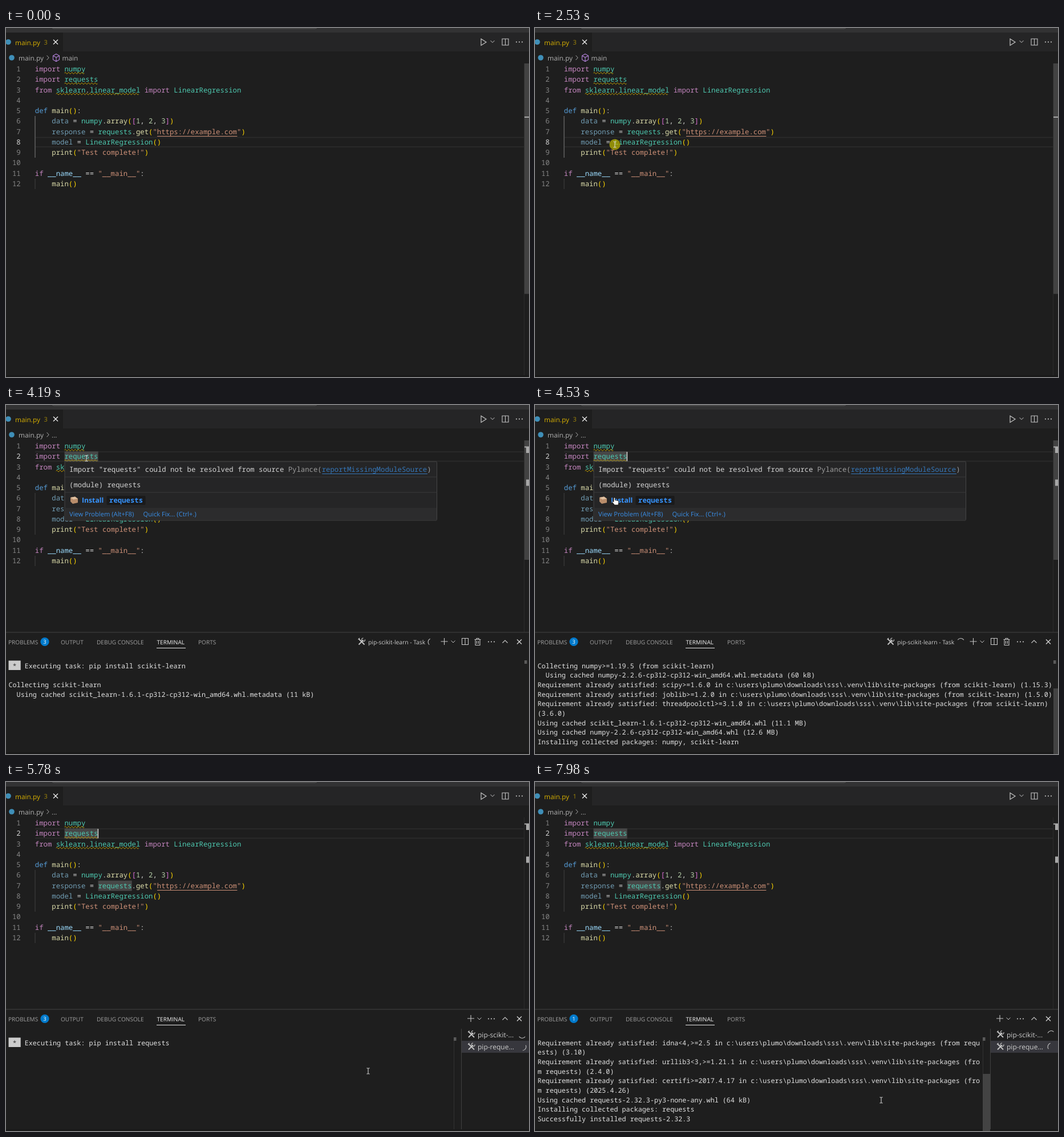
Write an HTML page that moves like this. It is 917x611 px and loops after 8000 ms.

```html
<!DOCTYPE html>
<html lang="en">
<head>
<meta charset="utf-8">
<title>Editor quick install</title>
<style>
  html, body { margin: 0; width: 100%; height: 100%; overflow: hidden; background: #1e1e1e; }
  svg { display: block; width: 100vw; height: 100vh; }
  text { white-space: pre; text-rendering: geometricPrecision; }
  .code { font: 500 12.31px "Noto Sans Mono", "DejaVu Sans Mono", monospace; }
  .term { font: 500 11.76px "Noto Sans Mono", "DejaVu Sans Mono", monospace; fill: #e2e2e2; }
  .ui { font-family: "Open Sans", "Noto Sans", sans-serif; }
</style>
</head>
<body>
<svg id="stage" viewBox="0 0 917 611"></svg>
<script>
const LOOP = 8000;
const PANEL = 2560, SECOND = 5100, CLICK = 3180, WORDS = 3450, LEAVE = 5400, SOLVED = 7500;
const CHAR = 7.388, LINE = 18.27;
const stage = document.getElementById("stage");
const timed = [];

const colX = c => 50.8 + c * CHAR;
const lineY = n => 72 + LINE * (n - 1);

function el(tag, attrs, parent = stage) {
  const node = document.createElementNS("http://www.w3.org/2000/svg", tag);
  for (const k in attrs) node.setAttribute(k, attrs[k]);
  parent.appendChild(node);
  return node;
}
const group = parent => el("g", {}, parent);
const rect = (x, y, width, height, fill, parent, more) =>
  el("rect", { x, y, width, height, fill, ...more }, parent);
const stroke = (d, color, parent, width = 1) =>
  el("path", { d, fill: "none", stroke: color, "stroke-width": width }, parent);
function label(x, y, str, size, fill, parent, more) {
  const node = el("text", { x, y, fill, "font-size": size, class: "ui", ...more }, parent);
  node.textContent = str;
  return node;
}
// Visible from one time up to another.
function during(node, from, to = LOOP) {
  timed.push({ node, from, to });
  return node;
}

const COLORS = {
  k: "#c586c0", t: "#4ec9b0", d: "#569cd6", f: "#dcdcaa", g: "#ffd700", o: "#da70d6",
  n: "#b5cea8", s: "#ce9178", v: "#9cdcfe", u: "#729eb5", w: "#d4d4d4", x: "#9d9d9d", l: "#3576b8"
};
// Rich text: {key} switches the colour.
function rich(x, y, str, parent) {
  const node = el("text", { x, y, class: "code" }, parent);
  const parts = ("{w}" + str).split(/\{(\w)\}/);
  for (let i = 1; i < parts.length; i += 2)
    if (parts[i + 1]) el("tspan", { fill: COLORS[parts[i]] }, node).textContent = parts[i + 1];
}

// Icons
const chevron = (x, y, p, c = "#c5c5c5") => stroke(`M${x - 3.5} ${y - 2}l3.5 3.5 3.5-3.5`, c, p);
const cross = (x, y, p, c = "#d4d4d4") => stroke(`M${x - 4} ${y - 4}l8 8m0-8l-8 8`, c, p, 1.3);
const split = (x, y, p) => stroke(`M${x - 5.5} ${y - 5.5}h11v11h-11zM${x} ${y - 5.5}v11`, "#c5c5c5", p, 1.1);
const plus = (x, y, p) => stroke(`M${x - 6} ${y}h12M${x} ${y - 6}v12`, "#c5c5c5", p, 1.1);
function dots(x, y, p) {
  for (const dx of [-5, 0, 5]) el("circle", { cx: x + dx, cy: y, r: 1.1, fill: "#c5c5c5" }, p);
}
function tools(x, y, p) {
  stroke(`M${x - 5} ${y - 5}l10 10M${x + 3} ${y - 3}l-8 8`, "#c5c5c5", p, 1.8);
  stroke(`M${x + 6} ${y - 4}a3 3 0 1 1-3-2.5M${x - 6} ${y - 4}l2.5-2.5`, "#c5c5c5", p, 1.2);
}
function trash(x, y, p) {
  stroke(`M${x - 5.5} ${y - 4}h11M${x - 2} ${y - 4}v-2h4v2M${x - 4} ${y - 4}v10h8v-10M${x - 1.5} ${y - 1.5}v5M${x + 1.5} ${y - 1.5}v5`, "#c5c5c5", p, 1.1);
}

// Window chrome
rect(0, 0, 917, 611, "#1e1e1e");
rect(0, 608, 917, 3, "#191919");
rect(0, 0, 917, 8, "#323233");
stroke("M80-3a4 4 0 0 0 4 4H542a4 4 0 0 0 4-4", "#5c5c5c");
rect(0, 8, 917, 33, "#252526");
rect(0, 8, 100, 33, "#1e1e1e");
el("circle", { cx: 4, cy: 24.5, r: 4.8, fill: "#3f8fb8" });
label(16, 29.5, "main.py", 11.8, "#d6af00");
const tabCount = label(66.5, 29, "3", 11, "#a38809");
cross(87, 24.5, stage, "#f0f0f0");
stroke("M833 19l9 5.7-9 5.7z", "#c5c5c5", stage, 1.2);
chevron(853, 24);
split(875.5, 24.5);
dots(900, 24.5);

el("circle", { cx: 10, cy: 52, r: 4.8, fill: "#3f8fb8" });
label(22, 56.5, "main.py", 11.8, "#b0b0b0");
stroke("M71.5 48l3.7 4-3.7 4", "#a9a9a9");
const crumb = during(group(), 0, 3600);
stroke("M88 45.5l5.5 3v7l-5.5 3-5.5-3v-7zM82.5 48.5l5.5 3 5.5-3M88 51.5v7", "#b180d7", crumb, 1.1);
label(98.5, 56.5, "main", 11.8, "#b0b0b0", crumb);
during(label(80, 56.5, "...", 11.8, "#b0b0b0"), 3600);

// Editor
function currentLine(n, from, to) {
  const g = during(group(), from, to), y = lineY(n);
  rect(51, y - 9.2, 858, 1.9, "#2a2a2a", g);
  rect(51, y + 7.2, 858, 1.9, "#2a2a2a", g);
}
currentLine(8, 0, CLICK);
currentLine(2, CLICK);

const wordBox = (line, col, len, fill, from, to) =>
  during(rect(colX(col), lineY(line) - 9, len * CHAR, 18, fill), from, to);
wordBox(3, 5, 20, "#20303a", 1530, 2440);
wordBox(2, 7, 8, "#474747", WORDS);
wordBox(7, 15, 8, "#474747", WORDS);

rect(50.5, 154, 1, 73, "#404040");
during(rect(50.5, 154, 1, 73, "#707070"), 0, CLICK);
rect(50.5, 264, 1, 18, "#404040");

const CODE = [
  "{k}import {t}numpy",
  "{k}import {t}requests",
  "{k}from {t}sklearn{w}.{t}linear_model {k}import {t}LinearRegression",
  "",
  "{d}def {f}main{g}(){w}:",
  "    {u}data{w} = {t}numpy{w}.{f}array{g}({o}[{n}1{w}, {n}2{w}, {n}3{o}]{g})",
  "    {u}response{w} = {t}requests{w}.{f}get{g}({s}\"https://example.com\"{g})",
  "    {u}model{w} = {t}LinearRegression{g}()",
  "    {f}print{g}({s}\"Test complete!\"{g})",
  "",
  "{k}if {v}__name__{w} == {s}\"__main__\"{w}:",
  "    {f}main{g}()"
];
const numbers = CODE.map((str, i) => {
  const y = lineY(i + 1) + 4;
  rich(colX(0), y, str);
  const num = el("text", { x: 25.7, y, class: "code", "text-anchor": "end" });
  num.textContent = i + 1;
  return num;
});
rect(colX(29), 189, 19 * CHAR, 1, COLORS.s);

function squiggle(line, col, len, to) {
  let d = `M${colX(col)} ${lineY(line) + 7}`;
  for (let i = 0; i < Math.round(len * CHAR / 5.8); i++) d += "q1.45-2.8 2.9 0q1.45 2.8 2.9 0";
  during(stroke(d, "#cca700"), 0, to);
}
squiggle(1, 7, 5, SOLVED);
squiggle(2, 7, 8, SOLVED);
squiggle(3, 5, 20, LOOP);

const brackets = during(group(), CLICK, WORDS);
for (const c of [28, 29])
  rect(colX(c), lineY(8) - 8.5, CHAR, 17, "none", brackets, { stroke: "#888888" });
const caret = rect(160.6, 82, 1.6, 16.5, "#d0d0cc");

// Editor scrollbar, shown while the pointer is over the editor, and its marks
rect(908, 62, 1, 546, "#2b2b2b");
during(rect(909, 62, 8, 403.5, "#424242"), 0, PANEL);
during(rect(909, 62, 8, 209, "#424242"), PANEL, LEAVE);
const mark = (x, y, h, from, to) => during(rect(x, y, 917 - x, h, "#a8a8a8"), from, to);
mark(909, 155, 2, 0, PANEL);
mark(909, 146, 2, PANEL, CLICK);
mark(909, 72.5, 2, CLICK);
mark(912, 142, 11, CLICK, WORDS);
mark(912, 73, 11, WORDS);
mark(912, 130.5, 11, WORDS);

// Panel
const panel = during(group(), PANEL);
rect(0, 397.5, 917, 210.5, "#1e1e1e", panel);
rect(0, 397.5, 917, 1, "#424242", panel);
[["PROBLEMS", 4], ["OUTPUT", 96], ["DEBUG CONSOLE", 159], ["TERMINAL", 264.5], ["PORTS", 337]]
  .forEach(([name, x]) => label(x, 419, name, 10.1, name === "TERMINAL" ? "#f0f0f0" : "#a0a0a0", panel));
rect(264, 425, 51, 1, "#e7e7e7", panel);
el("circle", { cx: 68, cy: 414.5, r: 7.6, fill: "#007acc" }, panel);
const badge = label(68, 418, "3", 9.5, "#ffffff", panel, { "text-anchor": "middle" });
dots(851, 414.5, panel);
stroke("M870.5 416.5l4.5-4.5 4.5 4.5", "#c5c5c5", panel, 1.2);
cross(900, 414.5, panel);

const single = during(group(panel), PANEL, SECOND);
tools(623.5, 414.5, single);
label(635, 419, "pip-scikit-learn - Task", 10.3, "#cccccc", single);
plus(768.5, 414, single);
chevron(784, 414.5, single);
split(805, 414, single);
trash(827, 414.5, single);

const list = during(group(panel), SECOND);
plus(815, 414, list);
chevron(830, 414.5, list);
rect(785, 447, 1, 161, "#333333", list);
rect(798, 432, 1, 176, "#404040", list);
rect(799, 453, 118, 21, "#37373d", list);
["pip-scikit-...", "pip-reque..."].forEach((name, i) => {
  tools(816, 442 + i * 21.5, list);
  label(827, 446.5 + i * 21.5, name, 12, "#cccccc", list);
});

// One turn takes 1500 ms; `angle` is the heading at time `ref`.
const spinners = [];
function spinner(x, y, angle, ref, from, to) {
  const outer = during(el("g", { transform: `translate(${x} ${y})` }, panel), from, to);
  const arc = stroke("M-5.3-3.7A6.5 6.5 0 0 1 5.3-3.7", "#c5c5c5", outer, 1.1);
  spinners.push({ arc, angle, ref });
}
spinner(746.5, 415, -45, 3330, PANEL, 3900);
spinner(746.5, 415, 0, 4530, 3900, SECOND);
spinner(905, 442, 180, 5780, SECOND);
spinner(905.5, 463.5, 120, 5780, SECOND);

// Terminal
const SITE = String.raw`c:\users\plumo\downloads\sss\.venv\lib\site-packages`;
const have = (pkg, by, ver) => `Requirement already satisfied: ${pkg} in ${SITE} (from ${by}) (${ver})`;
const TASKS = [
  { cols: 128, overflow: 4260, lines: [
    [2900, "    Executing task: pip install scikit-learn"],
    [4000, ""],
    [4000, "Collecting scikit-learn"],
    [4060, "  Using cached scikit_learn-1.6.1-cp312-cp312-win_amd64.whl.metadata (11 kB)"],
    [4200, "Collecting numpy>=1.19.5 (from scikit-learn)"],
    [4200, "  Using cached numpy-2.2.6-cp312-cp312-win_amd64.whl.metadata (60 kB)"],
    [4260, have("scipy>=1.6.0", "scikit-learn", "1.15.3")],
    [4260, have("joblib>=1.2.0", "scikit-learn", "1.5.0")],
    [4260, have("threadpoolctl>=3.1.0", "scikit-learn", "3.6.0")],
    [4330, "Using cached scikit_learn-1.6.1-cp312-cp312-win_amd64.whl (11.1 MB)"],
    [4330, "Using cached numpy-2.2.6-cp312-cp312-win_amd64.whl (12.6 MB)"],
    [4460, "Installing collected packages: numpy, scikit-learn"]
  ] },
  { cols: 110, overflow: 6840, lines: [
    [5400, "    Executing task: pip install requests"],
    [6580, ""],
    [6580, "Collecting requests"],
    [6640, "  Using cached requests-2.32.3-py3-none-any.whl.metadata (4.6 kB)"],
    [6770, have("charset-normalizer<4,>=2", "requests", "3.4.2")],
    [6770, have("idna<4,>=2.5", "requests", "3.10")],
    [6840, have("urllib3<3,>=1.21.1", "requests", "2.4.0")],
    [6840, have("certifi>=2017.4.17", "requests", "2025.4.26")],
    [6840, "Using cached requests-2.32.3-py3-none-any.whl (64 kB)"],
    [7040, "Installing collected packages: requests"],
    [7300, "Successfully installed requests-2.32.3"]
  ] }
];
const ROWS = 9;
const rows = Array.from({ length: ROWS }, (_, i) =>
  el("text", { x: 4.5, y: 460.8 + i * 16.67, class: "term" }, panel));
const star = group(panel);
rect(4.5, 447.5, 21.2, 16.5, "#cccccc", star);
label(15, 461, "*", 11.76, "#333333", star, { class: "term", "text-anchor": "middle", style: "fill:#333" });
const termMark = rect(909, 447, 4.5, 6, "#5a5a5a", panel);
const termBar = rect(909, 447, 8, 160, "#434343", panel);

function drawTerminal(t) {
  const second = t >= SECOND, task = TASKS[+second], out = [];
  for (const [at, str] of task.lines) {
    if (t < at) break;
    for (let i = 0; i === 0 || i < str.length; i += task.cols)
      out.push(str.slice(i, i + task.cols).replace(/^ (?=\()/, ""));
  }
  const last = out.slice(-ROWS);
  rows.forEach((row, i) => {
    const str = last[i] || "";
    if (row.textContent !== str) row.textContent = str;
  });
  star.style.display = out.length && out.length <= ROWS ? "" : "none";
  const h = 160 * ROWS / Math.max(ROWS, out.length);
  termMark.setAttribute("x", second ? 785 : 909);
  termBar.setAttribute("x", second ? 785 : 909);
  termBar.setAttribute("width", second ? 13 : 8);
  termBar.setAttribute("y", 607 - h);
  termBar.setAttribute("height", out.length > ROWS ? h + 4 : 0);
  termBar.setAttribute("opacity", Math.min(1, Math.max(0, (t - task.overflow) / 140)));
}

// Hover cards
const cards = [];
function card(x, y, w, message, module, pkg, from, to) {
  const g = group(), extra = (message.length - 1) * LINE;
  rect(x, y, w, 103 + extra, "#252526", g, { stroke: "#454545", rx: 1.5 });
  message.forEach((str, i) => rich(x + 8, y + 17.5 + i * LINE, str, g));
  const source = message.length > 1 ? 15 : 60;
  const under = y + 21 + extra;
  rect(x + 8 + source * CHAR, under, 25 * CHAR, 1, COLORS.l, g);
  const b = y + extra;
  rect(x, b + 26.5, w, 1, "#3a3a3a", g);
  rich(x + 8, b + 45, `(module) ${module}`, g);
  rect(x, b + 53.5, w, 1, "#3a3a3a", g);
  el("path", { d: `M${x + 10} ${b + 63}l8-1.5 5 3.5v7l-9 2-4-4z`, fill: "#b98d6b" }, g);
  el("path", { d: `M${x + 10} ${b + 63}l8-1.5 5 3.5-8 1.5z`, fill: "#e0c0a0" }, g);
  label(x + 30, b + 72, "Install", 12.2, "#3794ff", g, { "font-weight": 700 });
  rect(x + 73.5, b + 60, pkg.length * CHAR + 9, 16, "rgba(10,10,10,.4)", g, { rx: 2 });
  const name = el("text", { x: x + 78, y: b + 72, class: "code", fill: "#3794ff", style: "font-weight:700" }, g);
  name.textContent = pkg;
  rect(x + .5, b + 81, w - 1, 21.5, "#2c2c2d", g);
  label(x + 8, b + 96, "View Problem (Alt+F8)", 11.2, "#3a8ee6", g);
  label(x + 137.5, b + 96, "Quick Fix... (Ctrl+.)", 11.2, "#3a8ee6", g);
  cards.push({ g, from, to });
}
card(87.5, 117.5, 722, [
  'Import "sklearn.linear_model" could not be resolved from',
  "source {x}Pylance({l}reportMissingModuleSource{x})"
], "linear_model", "scikit-learn", 1530, 2440);
card(103, 99, 652.5, [
  'Import "requests" could not be resolved from source {x}Pylance({l}reportMissingModuleSource{x})'
], "requests", "requests", 4120, 4900);

// Pointer
const PATH = [
  [140, 842, 582], [930, 147, 120], [1000, 147, 120], [1130, 157, 109], [1790, 157, 109],
  [2120, 140, 204], [2600, 140, 204], [3060, 186, 91.5], [3420, 186, 91.5], [3800, 141, 93],
  [4180, 141, 93], [4460, 141, 168], [4900, 141, 168], [5600, 635, 506], [5950, 635, 506],
  [6350, 632, 523.5], [7440, 632, 523.5], [7900, 607, 557]
];
const CLICKS = [[2320, 2560], [CLICK, 3400], [4740, 4960]];
const HANDS = [[2000, 2440], [4330, 4900]];
const within = (spans, t) => spans.some(([a, b]) => t >= a && t < b);

const pointer = group();
const halo = el("circle", { r: 9.6, fill: "#bdb500", opacity: .72 }, pointer);
const beam = stroke("M-2.5-5h2l.5.6.5-.6h2M0-4.4V4.4M-2.5 5h2l.5-.6.5.6h2", "#e4e4e4", pointer, 1);
const hand = el("path", {
  d: "M-3-5.5q1.2-1.2 2.4 0v4l5 1q1.6.5 1.4 2.2l-.8 5.3h-6.5l-4-5q-.3-1.5 1.2-1.3l1.3 1z",
  fill: "#ffffff", stroke: "#111111", "stroke-width": .8
}, pointer);

function pointAt(t) {
  const i = PATH.findIndex(p => p[0] > t);
  if (i < 1) return i ? PATH[PATH.length - 1].slice(1) : PATH[0].slice(1);
  const [t0, x0, y0] = PATH[i - 1], [t1, x1, y1] = PATH[i];
  const u = (t - t0) / (t1 - t0), e = u * u * (3 - 2 * u);
  return [x0 + (x1 - x0) * e, y0 + (y1 - y0) * e];
}

const toggle = (node, on) => { node.style.display = on ? "" : "none"; };

function render(t) {
  for (const { node, from, to } of timed) toggle(node, t >= from && t < to);
  for (const { g, from, to } of cards) {
    toggle(g, t >= from && t < to);
    g.style.opacity = t < from + 60 ? .5 : 1;
  }
  const active = t < CLICK ? 8 : 2;
  numbers.forEach((num, i) => num.setAttribute("fill", i + 1 === active ? "#d6d6d6" : "#858585"));
  const left = t < SOLVED ? "3" : "1";
  if (badge.textContent !== left) badge.textContent = tabCount.textContent = left;
  toggle(caret, t >= CLICK && (t < 3940 || (t - 3440) % 1000 < 500));
  for (const { arc, angle, ref } of spinners)
    arc.setAttribute("transform", `rotate(${angle + (t - ref) * .24})`);
  drawTerminal(t);

  const [x, y] = pointAt(t), pointing = within(HANDS, t);
  toggle(pointer, t >= 140);
  pointer.setAttribute("transform", `translate(${x} ${y})`);
  toggle(halo, within(CLICKS, t));
  toggle(hand, pointing);
  toggle(beam, !pointing);
}

const start = performance.now();
function tick() {
  render((performance.now() - start) % LOOP);
  requestAnimationFrame(tick);
}
tick();
</script>
</body>
</html>
```
